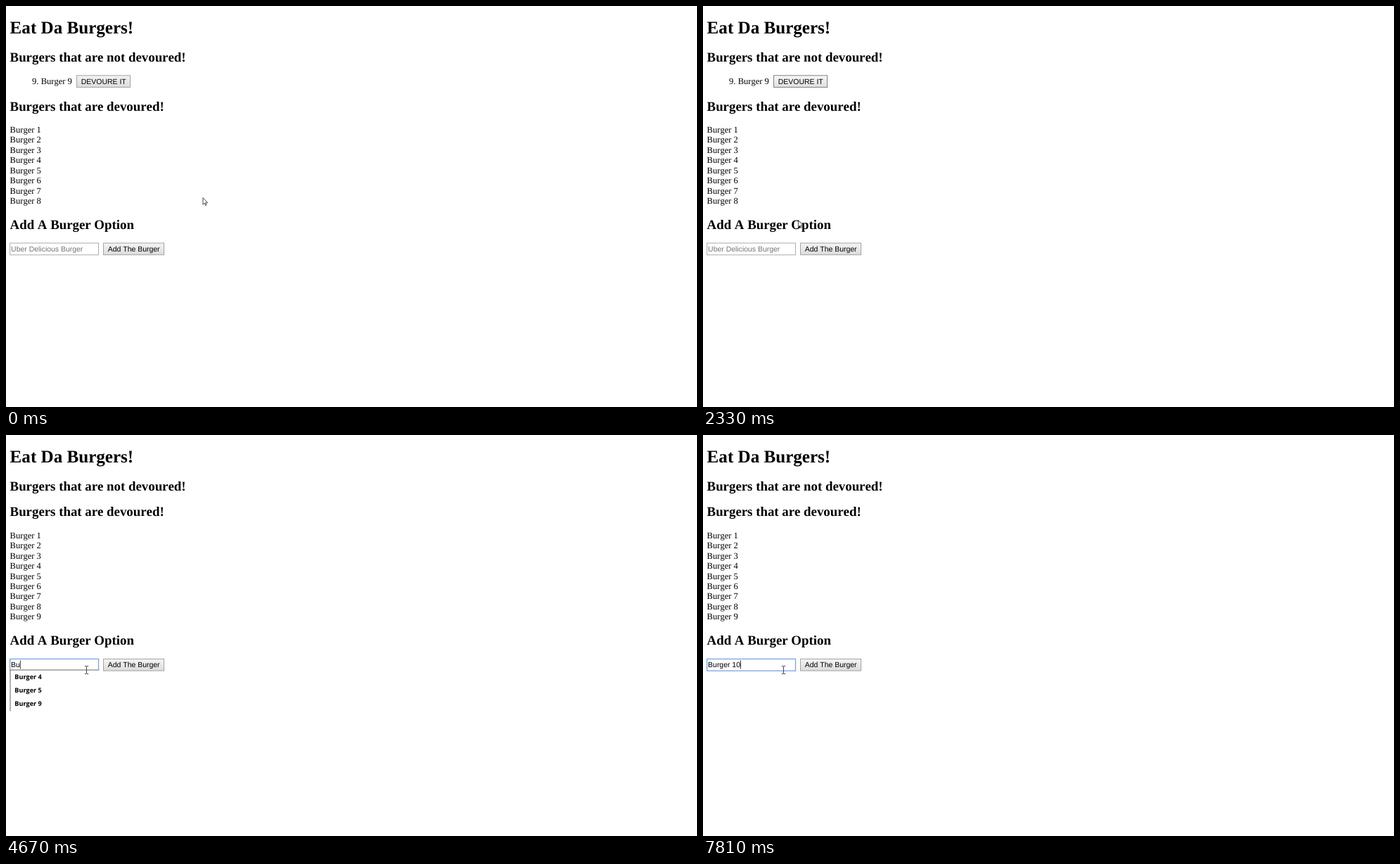
Animation, 982 px wide and 570 px high, one loop 8000 ms. Source, as an HTML page:

```html
<!DOCTYPE html>
<html lang="en">
<head>
<meta charset="utf-8">
<title>Eat Da Burgers!</title>
<style>
  html, body { margin: 0; width: 100%; height: 100%; overflow: hidden; background: #fff; }
  svg { display: block; }
  text { font: 12.55px "Liberation Serif", "Times New Roman", serif; font-kerning: none; text-rendering: geometricPrecision; white-space: pre; }
  .h1 { font-size: 25.1px; font-weight: bold; }
  .h2 { font-size: 18.83px; font-weight: bold; }
  .ui { font: 10.46px "Liberation Sans", Arial, sans-serif; font-kerning: none; }
  .hint { fill: #757575; }
  .option { font: bold 9.15px "Open Sans", "Noto Sans", sans-serif; }
  .button { fill: url(#rest); stroke: #a4a4a4; }
  .button.hover { fill: url(#over); stroke: #828282; }
  .button.press { fill: url(#down); stroke: #828282; }
</style>
</head>
<body>
<svg id="stage" width="982" height="570" viewBox="0 0 982 570">
  <defs>
    <linearGradient id="rest" x2="0" y2="1"><stop stop-color="#f4f4f4"/><stop offset="1" stop-color="#dcdcdc"/></linearGradient>
    <linearGradient id="over" x2="0" y2="1"><stop stop-color="#f8f8f8"/><stop offset="1" stop-color="#dfdfdf"/></linearGradient>
    <linearGradient id="down" x2="0" y2="1"><stop stop-color="#d6d6d6"/><stop offset="1" stop-color="#ededed"/></linearGradient>
  </defs>
</svg>
<script>
const LOOP = 8000, LEFT = 5.6, LINE = 14.43;
const RELOAD = 2640, FOCUS = 3410, MENU_ON = 4380, MENU_OFF = 7640;
const stage = document.getElementById('stage');

function add(parent, tag, attrs = {}, content = '') {
  const node = document.createElementNS('http://www.w3.org/2000/svg', tag);
  for (const key in attrs) node.setAttribute(key, attrs[key]);
  node.textContent = content;
  parent.appendChild(node);
  return node;
}
const label = (parent, x, y, content, cls = '') => add(parent, 'text', { x, y, class: cls }, content);
const show = (node, on) => node.setAttribute('display', on ? 'inline' : 'none');
const move = (node, x, y) => node.setAttribute('transform', `translate(${x} ${y})`);

function button(parent, x, y, width, caption) {
  const box = add(parent, 'rect', { x: x + .5, y: y + .5, width: width - 1, height: 16.7, class: 'button' });
  label(parent, x + 6.8, y + 12.2, caption, 'ui');
  return box;
}

label(stage, LEFT, 38.8, 'Eat Da Burgers!', 'h1');
label(stage, LEFT, 78.9, 'Burgers that are not devoured!', 'h2');

const pending = add(stage, 'g');
label(pending, 37.1, 110.5, '9. Burger 9');
const devour = button(pending, 100, 98.3, 77, 'DEVOURE IT');

const eaten = add(stage, 'g');
label(eaten, LEFT, 148.6, 'Burgers that are devoured!', 'h2');
const rows = [];
for (let i = 0; i < 9; i++) rows.push(label(eaten, LEFT, 180 + i * LINE, `Burger ${i + 1}`));

const form = add(stage, 'g');
label(form, LEFT, 316.9, 'Add A Burger Option', 'h2');
const field = add(form, 'rect', { x: 5.7, y: 337, width: 125.8, height: 16.8, fill: '#fff' });
const input = label(form, 7.1, 348.7, '', 'ui');
button(form, 138, 336.5, 87, 'Add The Burger');
const caret = add(form, 'rect', { y: 339, width: .8, height: 12, fill: '#000' });

const menu = add(stage, 'g');
add(menu, 'rect', { x: 5.5, y: 333.5, width: 127, height: 59, fill: '#fff' });
add(menu, 'path', { d: 'M6 392.5V334H132.5', fill: 'none', stroke: '#646464' });
[4, 5, 9].forEach((n, i) => label(menu, 12.3, 347 + i * 18.75, `Burger ${n}`, 'option'));

const arrow = add(stage, 'path', {
  d: 'M.4 .5V10.2L2.6 8.2L4 11.5L5.4 10.9L4 7.7H7Z',
  fill: '#fff', stroke: '#222', 'stroke-width': .8
});
const beam = add(stage, 'path', {
  d: 'M-2.6 -5.5H-.6L0 -5L.6 -5.5H2.6M0 -5V5M-2.6 5.5H-.6L0 5L.6 5.5H2.6',
  fill: 'none', stroke: '#333', 'stroke-width': .9
});

// Each entry holds from its time until the next one.
const pointer = [
  [0, 279.5, 272], [320, 258, 249], [420, 228, 216], [520, 211, 198],
  [710, 199, 177], [790, 182, 148], [870, 174.5, 135.5],
  [1100, 166, 115], [1170, 160, 103], [1240, 157.5, 103.5], [1340, 156, 104],
  [2170, 152, 154], [2250, 140, 266], [2330, 135, 304],
  [2800, 134, 306], [2880, 131, 311], [2960, 126, 319], [3040, 121, 326],
  [3120, 117, 331], [3200, 114.5, 334]
];
const typing = [
  [0, ''], [MENU_ON, 'B'], [4670, 'Bu'], [6140, 'Bur'], [6300, 'Burg'],
  [6590, 'Burger'], [6950, 'Burger '], [MENU_OFF, 'Burger 1'], [7810, 'Burger 10']
];
const carets = [
  [0, false], [FOCUS, true], [3960, false], [MENU_ON, true],
  [5150, false], [5680, true], [7500, false], [MENU_OFF, true]
];

function at(keys, t) {
  let found = keys[0];
  for (const key of keys) if (key[0] <= t) found = key;
  return found;
}

const ruler = document.createElement('canvas').getContext('2d');
function textWidth(content) {
  ruler.font = '104.6px "Liberation Sans", Arial, sans-serif';
  return ruler.measureText(content).width / 10;
}

function draw(t) {
  const done = t >= RELOAD, focused = t >= FOCUS;
  show(pending, !done);
  show(rows[8], done);
  move(eaten, 0, done ? -33.1 : 0);
  move(form, 0, done ? -18.6 : 0);

  const state = t >= 1480 && t < 1640 ? 'press' : t >= 1100 ? 'hover' : '';
  devour.setAttribute('class', `button ${state}`);

  const typed = at(typing, t)[1];
  input.textContent = typed || 'Uber Delicious Burger';
  input.setAttribute('class', typed ? 'ui' : 'ui hint');
  field.setAttribute('stroke', focused ? '#7ba4e6' : '#ababab');
  field.setAttribute('stroke-width', focused ? 1.3 : 1);
  show(caret, at(carets, t)[1]);
  caret.setAttribute('x', 7.1 + textWidth(typed));
  show(menu, t >= MENU_ON && t < MENU_OFF);

  const [, x, y] = at(pointer, t);
  const overField = done && x < 132 && y > 318;
  show(arrow, !overField);
  show(beam, overField);
  move(overField ? beam : arrow, x, y);
}

const start = performance.now();
function tick() {
  draw((performance.now() - start) % LOOP);
  requestAnimationFrame(tick);
}
draw(0);
requestAnimationFrame(tick);
</script>
</body>
</html>
```
